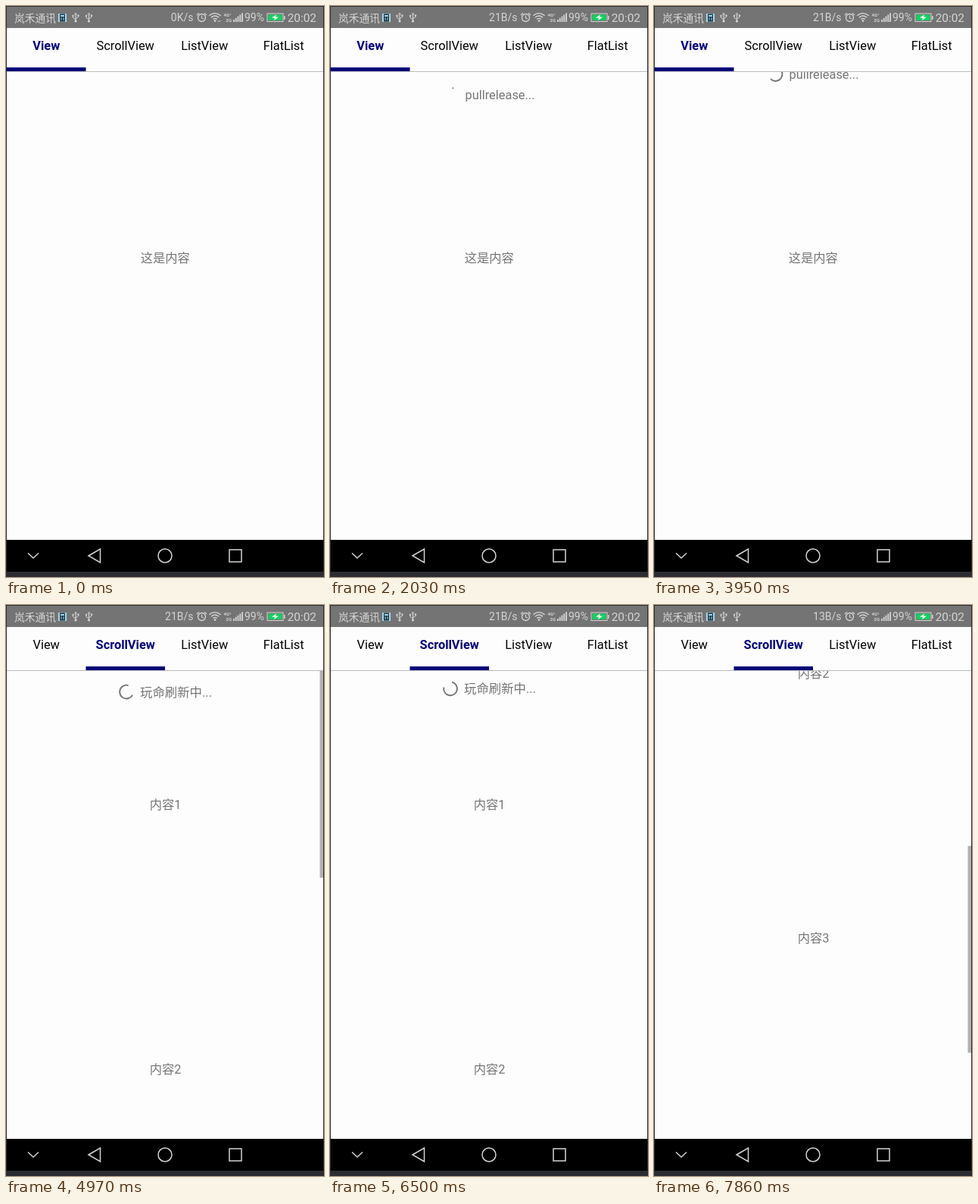
An HTML page with a canvas that plays this animation: 420x753 px, repeating every 8000 ms.

```html
<!DOCTYPE html>
<html lang="zh-CN">
<head>
<meta charset="utf-8">
<title>Pull to refresh</title>
<style>
html, body { margin: 0; width: 100%; height: 100%; overflow: hidden; background: #fdfdfe; }
canvas { display: block; width: 420px; height: 753px; }
</style>
</head>
<body>
<canvas id="stage"></canvas>
<script>
const W = 420, H = 753, LOOP = 8000;
const TOP = 87, BOTTOM = 704, HEADER = 60, ROW = 349;
const GREY = '#757575', NAVY = '#000078', LIGHT = '#d4d4d4';
const FONT = 'Roboto, "Noto Sans CJK SC", "Noto Sans CJK", sans-serif';

const canvas = document.getElementById('stage');
const ctx = canvas.getContext('2d');
const dpr = window.devicePixelRatio || 1;
canvas.width = W * dpr;
canvas.height = H * dpr;

const clamp = v => Math.min(1, Math.max(0, v));
const progress = (t, start, length) => clamp((t - start) / length);
const easeInOut = p => p < .5 ? 2 * p * p : 1 - 2 * (1 - p) * (1 - p);
const easeOut = p => 1 - (1 - p) ** 3;

function rect(x, y, w, h, color) {
  ctx.fillStyle = color;
  ctx.fillRect(x, y, w, h);
}

function text(str, x, y, size, color, align = 'left', weight = 400) {
  ctx.font = `${weight} ${size}px ${FONT}`;
  ctx.textAlign = align;
  ctx.fillStyle = color;
  ctx.fillText(str, x, y);
}

function line(points, color, width, close) {
  ctx.beginPath();
  points.forEach(([x, y]) => ctx.lineTo(x, y));
  if (close) ctx.closePath();
  ctx.strokeStyle = color;
  ctx.lineWidth = width;
  ctx.stroke();
}

function arc(x, y, r, from, to, color, width) {
  ctx.beginPath();
  ctx.arc(x, y, r, from, to);
  ctx.strokeStyle = color;
  ctx.lineWidth = width;
  ctx.stroke();
}

function dot(x, y, r, color) {
  ctx.beginPath();
  ctx.arc(x, y, r, 0, Math.PI * 2);
  ctx.fillStyle = color;
  ctx.fill();
}

// Cubic curve (.4, 0, .2, 1), solved by bisection
function fastOutSlowIn(x) {
  let lo = 0, hi = 1;
  for (let i = 0; i < 16; i++) {
    const u = (lo + hi) / 2, v = 1 - u;
    if (1.2 * v * v * u + .6 * v * u * u + u ** 3 < x) lo = u;
    else hi = u;
  }
  return lo * lo * (3 - 2 * lo);
}

function spinner(x, y, age) {
  const u = age % 1333 / 1333;
  const end = .75 * fastOutSlowIn(clamp(u * 2));
  const start = .75 * fastOutSlowIn(clamp(u * 2 - 1));
  const turn = u * .25 + age * 2 / 4444 - .25;
  const a = (start + turn) * Math.PI * 2;
  const b = (Math.max(end, start + .03) + turn) * Math.PI * 2;
  arc(x, y, 8.9, a, b, GREY, 1.9);
}

const bursts = [[710, 1640, 8], [1760, 2720, 8], [2840, 3830, 8],
  [4580, 5510, 8], [5660, 6620, 8], [7170, 7860, 6]];

function sample(t) {
  for (const [from, to, count] of bursts) {
    const step = (to - from) / (count - 1);
    if (t >= from && t < to + step) {
      return from + Math.min(count - 1, Math.floor((t - from + 10) / step)) * step;
    }
  }
  return t;
}

function header(label, shift, age) {
  const y = 117 + shift;
  ctx.font = `400 16.4px ${FONT}`;
  const left = 210.5 - (ctx.measureText(label).width + 28) / 2;
  spinner(left + 10, y, age);
  text(label, left + 28, y + 6, 16.4, GREY);
}

function viewPage(t) {
  text('这是内容', 210.3, 338, 16.3, GREY, 'center');
  if (t < 700 || t >= 3950) return;
  if (t < 1745) {
    const pull = 159 * easeInOut(progress(t, 640, 980));
    header(pull < 100 ? 'pulling...' : 'pullok...', pull - HEADER, t - 700);
  } else {
    const back = 99 * (1 - easeOut(progress(t, 1700, 290)));
    const hide = HEADER * easeInOut(progress(t, 3593, 500));
    header('pullrelease...', back - hide, Math.max(0, t - 2005));
  }
}

function scrollPage(t) {
  const offset = t < 7170 ? 0 : 20.5 + 501.5 * easeInOut(progress(t, 7170, 690));
  for (let i = 0; i < 4; i++) {
    text('内容' + (i + 1), 210.5, 268.5 + i * ROW - offset, 16.3, GREY, 'center');
  }
  if (t < 6770) {
    const shown = easeInOut(progress(t, 4550, 500)) - easeInOut(progress(t, 6365, 500));
    header('玩命刷新中...', HEADER * (shown - 1), t - 4470);
  }
  const view = BOTTOM - TOP, ratio = view / (ROW * 4);
  ctx.globalAlpha = t < 7170 ? 1 - progress(t, 6030, 250) : 1;
  rect(414.5, TOP + offset * ratio, 4.5, view * ratio, '#b1b1b2');
  ctx.globalAlpha = 1;
}

function usb(x) {
  line([[x, 11], [x, 20]], LIGHT, 1.2);
  line([[x - 3.5, 13.5], [x - 3.5, 15.5], [x, 18]], LIGHT, 1);
  line([[x + 3.5, 12.5], [x + 3.5, 14.5], [x, 17]], LIGHT, 1);
  line([[x - 1.5, 11.5], [x, 9], [x + 1.5, 11.5]], LIGHT, 1);
  dot(x - 3.5, 13, 1.2, LIGHT);
  rect(x + 2.4, 11.5, 2.2, 2.2, LIGHT);
  dot(x, 20, 1.6, LIGHT);
}

function statusBar(t) {
  rect(1, 1, 418, 28, '#747474');
  text('岚禾通讯', 11, 20.5, 13.75, LIGHT);

  rect(69, 10, 11, 11, '#a9d8ee');
  rect(71, 10.5, 7, 10, '#17303c');
  rect(72, 12, 5, 2, '#a9d8ee');
  for (let i = 0; i < 4; i++) rect(72 + i % 2 * 3, 15.5 + (i >> 1) * 2, 2, 1, '#a9d8ee');
  usb(92);
  usb(109.5);

  const speed = t < 800 ? '0K/s' : t < 6770 ? '21B/s' : '13B/s';
  text(speed, 247.5, 20, 14, LIGHT, 'right');

  arc(258.5, 15.5, 5, 0, Math.PI * 2, LIGHT, 1.3);
  line([[258.5, 12.5], [258.5, 16], [261, 17]], LIGHT, 1.1);
  line([[252, 12], [255, 9.3]], LIGHT, 1.3);
  line([[262, 9.3], [265, 12]], LIGHT, 1.3);

  for (const r of [3.6, 7, 10.4]) {
    arc(276, 20, r, -Math.PI * .76, -Math.PI * .24, LIGHT, 1.4);
  }
  dot(276, 19.6, 1.4, LIGHT);
  if (t < 430) line([[279.5, 19], [281.5, 21], [283.5, 19]], LIGHT, 1);

  text('4G⁺', 287.5, 14.2, 6, LIGHT, 'left', 700);
  text('2G', 290.5, 21.3, 6, LIGHT, 'left', 700);
  for (let i = 0; i < 5; i++) {
    const h = 3 + i * 2.2;
    rect(300 + i * 2.8, 21 - h, 1.8, h, LIGHT);
  }
  text('99%', 315, 20, 14, LIGHT);

  ctx.strokeStyle = LIGHT;
  ctx.lineWidth = 1;
  ctx.strokeRect(345, 10, 21, 10.5);
  rect(346.5, 11.5, 18, 7.5, '#16cf62');
  rect(367, 13, 1.5, 5, LIGHT);
  ctx.beginPath();
  [[357, 11.5], [351, 15.5], [355, 15.8], [354, 19], [360, 14.8], [356, 14.5]]
    .forEach(([x, y]) => ctx.lineTo(x, y));
  ctx.fillStyle = '#fff';
  ctx.fill();

  text('20:02', 410, 20.8, 15.4, LIGHT, 'right');
}

function tabs(active) {
  rect(1, 29, 418, 58, '#fdfdfe');
  rect(1, 86, 418, 1, '#bcbcc0');
  ['View', 'ScrollView', 'ListView', 'FlatList'].forEach((name, i) => {
    const on = i === active;
    text(name, 53.2 + i * 104.5, 58, 16.4, on ? NAVY : '#000', 'center', on ? 700 : 400);
  });
  rect(1 + active * 104.5, 81, 104.5, 5, NAVY);
}

function navBar() {
  rect(1, BOTTOM, 418, 42, '#000');
  line([[29, 721.5], [36, 728], [43, 721.5]], LIGHT, 1.5);
  line([[109, 725], [124.5, 716], [124.5, 734]], LIGHT, 1.5, true);
  arc(210, 725, 9, 0, Math.PI * 2, LIGHT, 1.5);
  line([[295, 717], [311, 717], [311, 733], [295, 733]], LIGHT, 1.5, true);
}

function draw(now) {
  const t = sample(now % LOOP);
  const active = t < 4580 ? 0 : 1;
  ctx.setTransform(dpr, 0, 0, dpr, 0, 0);
  rect(0, 0, W, H, '#2c2d32');
  rect(1, TOP, 418, BOTTOM - TOP, '#fdfdfe');

  ctx.save();
  ctx.beginPath();
  ctx.rect(1, TOP, 418, BOTTOM - TOP);
  ctx.clip();
  (active ? scrollPage : viewPage)(t);
  ctx.restore();

  statusBar(t);
  tabs(active);
  navBar();
}

let begin;
function tick(now) {
  begin ??= now;
  draw(Math.max(0, now - begin));
  requestAnimationFrame(tick);
}
requestAnimationFrame(tick);
</script>
</body>
</html>
```
